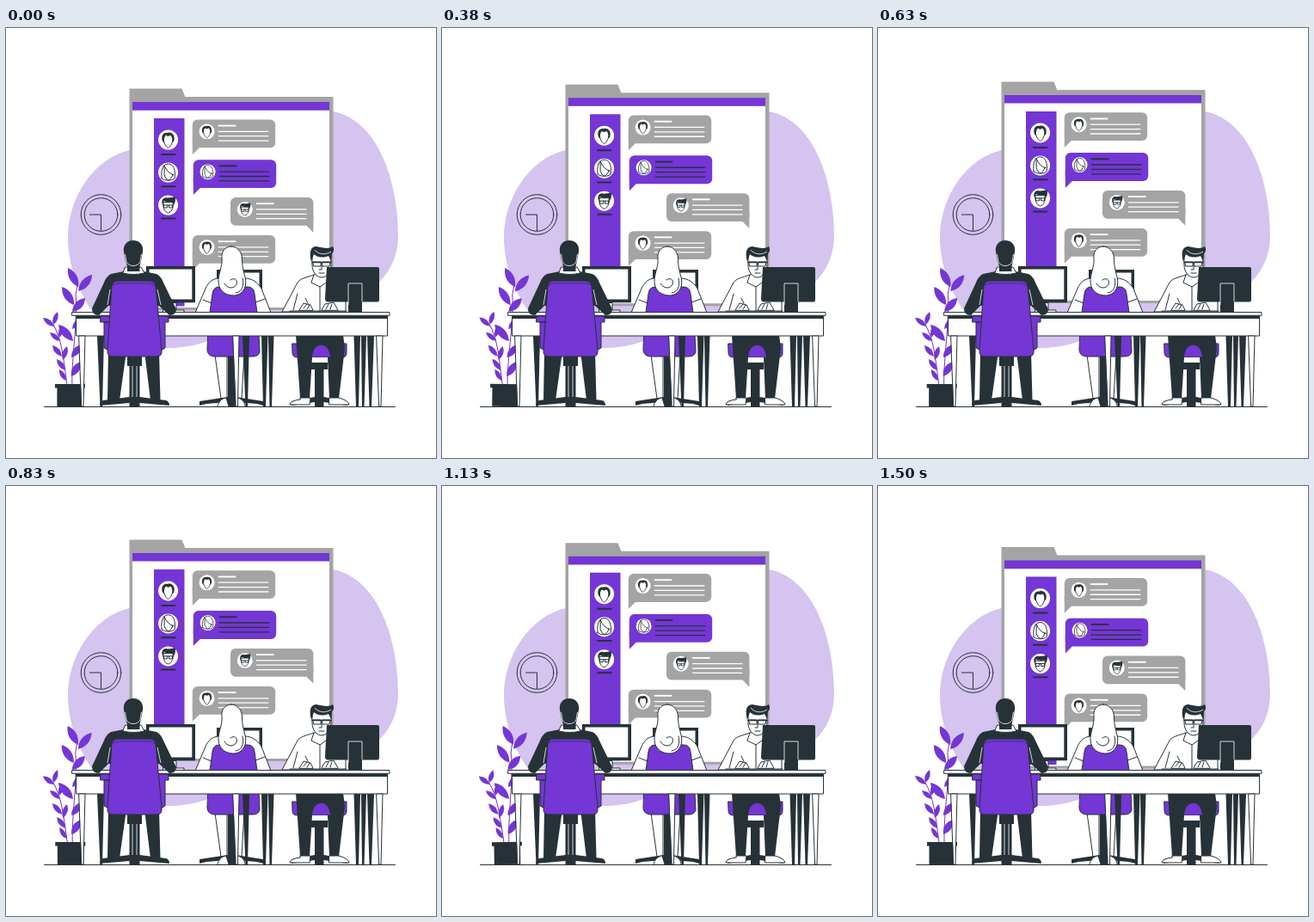
Recreate the animation shown at these times as an HTML page. Size 500 by 500 pixels, loop 1.54 s.

```html
<!DOCTYPE html>
<html lang="en">
<head>
<meta charset="utf-8">
<title>Team chat</title>
<style>
html, body { margin: 0; width: 100%; height: 100%; overflow: hidden; background: #fff; }
svg { display: block; width: 100vw; height: 100vh; }
.p { fill: #7436d5; }
.d { fill: #263238; }
.g { fill: #a4a4a4; }
.w { fill: #fff; }
.o { stroke: #263238; stroke-width: 1; stroke-linejoin: round; stroke-linecap: round; }
.n { fill: none; }
.l { stroke: #fff; stroke-width: .8; fill: none; }
</style>
</head>
<body>
<svg viewBox="0 0 500 500">
<defs>
  <g id="man">
    <circle r="11.5" class="w"/>
    <path class="d" d="M-6.5 2C-9-5-5-9-1-8C4-10 9-5 6.5 2L5 3H-5Z"/>
    <path class="w o" stroke-width=".7" d="M-5.2-1L-4-5Q-2-6 0-4.5Q2-6 4-5L5.2-1C5.5 3 3 8 0 9.5C-3 8-5.5 3-5.2-1Z"/>
  </g>
  <g id="woman">
    <circle r="11.5" class="w"/>
    <path class="w o" d="M-7.5 7C-9-3-6-10 0-10C6-10 9-3 7.5 7C4 10-4 10-7.5 7Z"/>
    <path class="n o" d="M-4.5-8V3Q-3 8 0 9Q4 8 5.5 2M-4.5-8Q-1 1 6.5 3"/>
  </g>
  <g id="specs">
    <circle r="11.5" class="w"/>
    <path class="w o" d="M-5.5-3V2C-5 6-2 9 0 9C2 9 5 6 5.5 2V-3Z"/>
    <path class="d" d="M-6.5 0C-9-6-5-10-1-8.5C3-9 6-9 8-10C9-6 8-3 6.5 0L5-4C1-3-3-4-5-5Z"/>
    <path class="n o" stroke-width="1.4" d="M-6 0H6M-5 0V3H-1V0M1 0V3H5V0"/>
  </g>
</defs>

<path fill="#d5c3f0" d="M144 142C100 152 72 200 72 243C72 275 84 308 104 334C130 363 160 373 195 372C211 371 225 368 240 362C280 350 310 334 345 322C385 320 416 311 433 296C449 281 456 262 456 240C456 185 436 108 380 97Z"/>

<g id="panel">
  <path class="g" d="M143.5 70.5H204.5L208.3 80H380.5V328H143.5Z"/>
  <path class="w" d="M147 95H376V325H147Z"/>
  <path class="p" d="M147 86H376V95.7H147ZM172 105H207.5V323.5H172Z"/>
  <use href="#man" x="188.6" y="130"/>
  <use href="#woman" x="188.6" y="168"/>
  <use href="#specs" x="188.6" y="206"/>
  <path class="n o" style="stroke-width:2" d="M181 147H196.5M181 184.3H196.5M181 221.6H196.5"/>
</g>

<g class="n o">
  <circle cx="110.5" cy="217" r="23.3"/>
  <circle cx="110.5" cy="217" r="19.3"/>
  <path d="M97.5 217H110.5V235.5"/>
</g>

<g id="plant">
  <path class="d" d="M57 414H92V418.5H90V440H59.5V418.5H57Z"/>
</g>

<path class="o" d="M44.5 440.5H452.5"/>

<!-- left screen -->
<path class="d" d="M163 277H220V319.3H163Z"/>
<path class="w" d="M166.5 280.5H216.3V315.5H166.5Z"/>
<path class="w o" d="M183 319.5H198V328H207V331H183Z"/>

<!-- middle screen -->
<path class="d" d="M245 281H298V316H245Z"/>
<path class="w" d="M248.5 284.5H294.5V316H248.5Z"/>

<!-- middle person -->
<path class="w o" d="M248 291C240 291 235 296 232 303L220 331H308L297 303C293 296 286 291 278 291Z"/>
<path class="n o" d="M229 316L239 320M290 319L301 315"/>
<path class="p o" d="M237 331L240 309Q241 301 248 301H281Q288 301 289 309L292 331Z"/>
<path class="w o" d="M262 254C254 254 250 261 251 268C252 277 246.5 286 247 296C248 307 257 311.5 266 311C275 310 280 302 278.5 292C277 284 274.5 280 274.5 268C274 259 268 254 262 254Z"/>
<path class="n o" d="M254 297C257 303 265 304 268 298C270 292 265 290 261 293M275 291C277 299 275 307 267 308"/>

<path class="w o" d="M243 380L250 431L248 438H256L257 431V380Z"/>
<path class="w o" d="M268 380H277L274 431L277 438H265L268 428Z"/>
<path class="p o" d="M235 357H294L295 376Q294 382 287 382H243Q235 382 234 375Z"/>
<path class="d" d="M258 382H267V429L299 434V439L292 437L267 435V440H258V435L233 437L225 439V434L258 429Z"/>
<path class="w o" d="M246 440C247 435 250 431 256 430L259 440ZM266 440L269 430C275 431 278 436 278 440Z"/>

<!-- right person -->
<path class="p o" d="M333 367H396V378Q396 383 391 383H339Q333 383 333 378Z"/>
<path class="w" d="M354 383H376V430H354Z"/>
<path class="d" d="M354 389H374V397H369.5V429L397 434V439L369.5 435V440H359V435L332 439V434L359 429V397H354Z"/>
<path class="d" d="M337 357H392L394 372L387 431H376L374 383H377C376 364 357 364 356 383L353 431H342Z"/>
<path class="w o" d="M342 430H354L353 438H330Q331 433 342 432ZM376 430H387Q398 433 399 438H376Z"/>
<path class="w o" d="M358 287C350 290 342 291 339 296L321 330H395V297C389 291 379 290 373 286Z"/>
<path class="n o" d="M339 309L334 328M358 287L355 296L365 301L375 294L373 286M365 301V329M348 314L351 320"/>
<path class="w o" d="M356 263V276C356 283 361 290 367 290C373 290 377 284 378 276V263Z"/>
<path class="d" d="M355 272C352 261 354 254 361 254C369 256 376 257 380 254C382 257 381 261 379 262L378 271L375 265C367 268 361 266 358 263Z"/>
<path class="l" d="M359 258C364 264 372 264 378 260"/>
<path class="w o" d="M357 272H366V277H358ZM368 272H377L376 277H368Z"/>
<path class="n o" style="stroke-width:1.6" d="M356 272.5H378"/>
<path class="n o" d="M367 273V281H364M364 285H370"/>
<path class="w o" d="M341 328L346 320L354 322L357 328ZM367 328L371 321L381 319L386 328Z"/>
<path class="n o" d="M346 326L350 321M350 327L353 322M372 327L375 321M377 327L379 321M330 329H396"/>

<!-- right screen -->
<path class="d" d="M373 278H432Q434 278 434 280V316Q434 318.5 432 318.5H375Q371 318.5 371 315Z"/>
<path class="d" d="M398 297H414V331H398Z"/>
<path class="l" d="M398 322V297H414V318"/>

<!-- desk -->
<path class="d" d="M106 358H114L112 440H109.5ZM275 358H283L281 440H278.5ZM297 358H304.5L302 440H299ZM305 358H311.5L309 440H306.5ZM404.5 358H412L410 440H407ZM413 358H419L416.5 440H414ZM420 358H428L425 440H422.5Z"/>
<path class="w o" d="M82 335H443.5V358H82Z"/>
<path class="d" d="M82 334.5H443.5V338H82Z"/>
<path class="w o" d="M77 330.5H446V334.3H77Z"/>
<path class="w o" d="M85 358H92L90 440H88ZM264 358H271L269.5 440H267.5ZM431 358H438L436 440H434Z"/>

<!-- left person -->
<path class="d" d="M119 376H140L132 433H118ZM161 376H178L179.5 433H168Z"/>
<path class="d" d="M141 380H158V393H155.5V429L186 433Q190 434 190 439L155.5 436V440H143.5V436L109 439Q109 434 113 433L143.5 429V393H141Z"/>
<path class="l" d="M147 393V429M152 393V429"/>
<path class="d" d="M137 283L122 286C118 288 116 291 114 296L100 326Q100 334 108 334L119 323H178L190 334Q198 334 198 327L183 296C181 291 179 288 175 286L160 283Z"/>
<path class="l" d="M121 304L118 322M176 304L180 322"/>
<path class="w o" d="M139 278H157L161 285Q148 288 136 285Z"/>
<path class="d" d="M148 247C140 247 136 253 137 260L139 271L141 277V283H155.5V277L157 271L159 260C160 253 156 247 148 247Z"/>
<path class="l" d="M138.5 263L140 272C143 278 153 278 156 272L157.5 263"/>
<path class="p o" d="M110 335H122V342H114V372L122 376V342H110ZM176 335H189V342H185V372L178 376V342H176Z"/>
<path class="p o" d="M123 300Q124 294 130 294H167Q173 294 174 300L181 374Q182 382 175 382H124Q117 382 118 374Z"/>
<path class="n o" style="stroke-width:.7" d="M124 299Q126 297 131 297H166Q171 297 173 299"/>
</svg>
<script>
const NS = 'http://www.w3.org/2000/svg';
const panel = document.getElementById('panel');
const plant = document.getElementById('plant');

function add(parent, tag, attrs) {
  const el = document.createElementNS(NS, tag);
  for (const key in attrs) el.setAttribute(key, attrs[key]);
  parent.appendChild(el);
}

function bubble(x, y, face, cls, ink, right) {
  const b = y + 32.8, r = x + 96.4;
  add(panel, 'rect', { x, y, width: 96.4, height: 32.8, rx: 6, class: cls });
  const tail = right
    ? `M${r} ${y + 20}V${b + 8}L${r - 8} ${b}Z`
    : `M${x} ${y + 20}V${b + 8}L${x + 8} ${b}Z`;
  add(panel, 'path', { d: tail, class: cls });
  add(panel, 'use', { href: '#' + face, transform: `translate(${x + 16.8} ${y + 14}) scale(.78)` });
  const tx = x + 30;
  add(panel, 'path', { d: `M${tx} ${y + 7.2}h20.5`, stroke: ink, 'stroke-width': 1.9 });
  for (const dy of [13.9, 19.3, 24.7])
    add(panel, 'path', { d: `M${tx} ${y + dy}h58.5`, stroke: ink, 'stroke-width': 1.3 });
}

function leaf(x, y, tx, ty, fat) {
  const mx = (x + tx) / 2, my = (y + ty) / 2;
  const nx = (ty - y) * fat, ny = (x - tx) * fat;
  add(plant, 'path', {
    d: `M${x} ${y}Q${mx + nx} ${my + ny} ${tx} ${ty}Q${mx - nx} ${my - ny} ${x} ${y}Z`,
    class: 'p'
  });
}

bubble(216.8, 106.4, 'man', 'g', '#fff');
bubble(217.8, 153.2, 'woman', 'p', '#263238');
bubble(261, 197, 'specs', 'g', '#fff', true);
bubble(216.8, 241, 'man', 'g', '#fff');

for (const d of ['M71 414C67 385 65 362 55 345', 'M77 414C76 380 84 340 81 310L83 298'])
  add(plant, 'path', { d, fill: 'none', stroke: '#7436d5', 'stroke-width': 1 });

[
  [84, 301, 72, 279, .36], [84, 306, 100, 287, .36],
  [79, 322, 65, 301, .36], [77, 330, 92, 314, .4],
  [78, 364, 61, 345, .36], [77, 350, 88, 337, .4],
  [76, 383, 88, 368, .4], [76, 405, 87, 388, .4],
  [56, 347, 43, 337, .36], [55, 345, 60, 330, .36],
  [63, 364, 51, 354, .36], [62, 360, 65, 346, .36],
  [65, 382, 54, 369, .36], [66, 386, 71, 370, .36],
  [69, 398, 59, 385, .36], [70, 410, 62, 397, .36]
].forEach(a => leaf(...a));

const LOOP = 1540, STEPS = 37, FPS = 24;
const wave = p => 1 - Math.abs(2 * (p % 1) - 1);

function draw(ms) {
  const step = Math.min(STEPS - 1, Math.floor((ms % LOOP + 5) * FPS / 1000));
  const p = (step + 1) / STEPS;
  const lift = .54 - 10 * wave(p);
  const sway = 2 * wave(p + .25) - 1;
  panel.setAttribute('transform', `translate(0 ${lift.toFixed(3)})`);
  plant.setAttribute('transform', `rotate(${sway.toFixed(3)} 71 359.5)`);
}

const start = performance.now();
function tick() {
  draw(performance.now() - start);
  requestAnimationFrame(tick);
}
draw(0);
requestAnimationFrame(tick);
</script>
</body>
</html>
```
